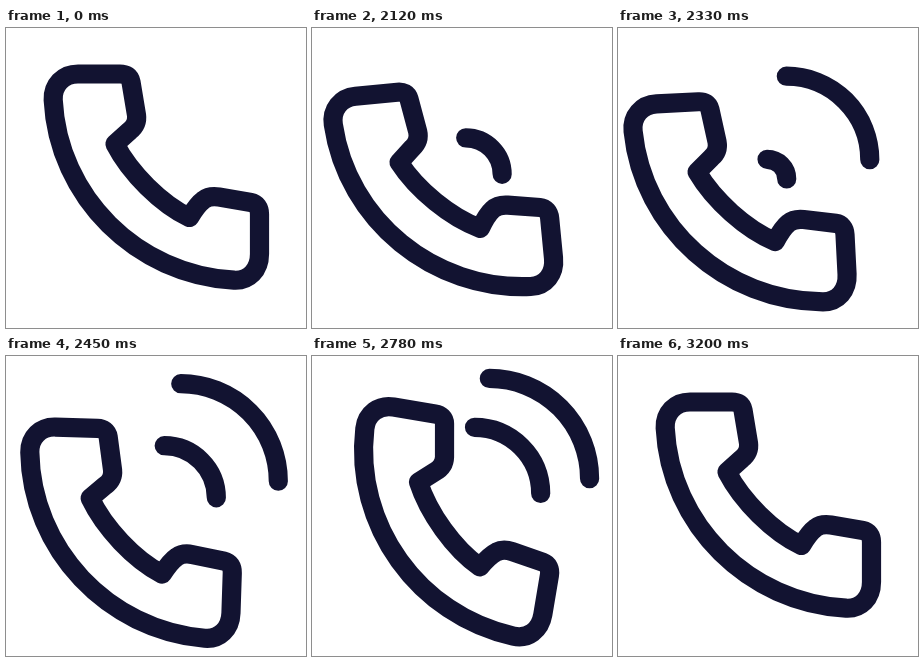
Recreate the animation shown at these times as an HTML page. Size 300 px wide and 300 px high, loop 3.26 s.

```html
<!DOCTYPE html>
<html lang="en">
<head>
<meta charset="utf-8">
<title>Ringing phone</title>
<style>
  html, body { margin: 0; width: 100%; height: 100%; overflow: hidden; background: #fff; }
  svg { display: block; width: 100%; height: 100%; }
</style>
</head>
<body>
<svg viewBox="0 0 300 300" fill="none" stroke="#121331" stroke-width="19.2" stroke-linecap="round" stroke-linejoin="round">
  <path id="phone" d="M72 46H114C120 46 124 48.500 125 54L130.500 87C131.300 93 129 98.500 124 102.500L109 116C124 145 155 176 183.500 189.500C188 182 192 176 197.500 172C202 168.500 207 168 213 169L245 174.500C250.500 175.500 253.500 180 253.500 186V226C253.500 242 243 253 228 252.200C131 247 52 169 47.200 72C46.500 57 57 46 72 46Z"/>
  <path class="wave"/>
  <path class="wave"/>
  <path class="wave"/>
</svg>
<script>
const LOOP = 3260, START = 2030, END = 3200, STEP = 30;
const WAVE_GAP = 270, WAVE_LIFE = 540;

const phone = document.getElementById('phone');
const waves = [...document.querySelectorAll('.wave')];

// Eased 0 to 1 between two times
function ease(t, from, to) {
  const u = Math.min(1, Math.max(0, (t - from) / (to - from)));
  return (1 - Math.cos(Math.PI * u)) / 2;
}

// Distance towards the lower left corner
const shift = t => 27 * ease(t, 2000, 2210) * (1 - ease(t, 2405, 3110));

// Steady shaking with a slow lean to the right, then settling
function tilt(t) {
  const shake = -9 * Math.sin(2 * Math.PI * (t - 2006) / 298);
  const lean = 0.0058 * (t - START);
  return (shake + lean) * (1 - ease(t, 2780, 3110));
}

// Quarter circle that grows while drifting to the upper right
function drawWave(el, age) {
  const shown = age >= 0 && age < WAVE_LIFE;
  el.style.display = shown ? '' : 'none';
  if (!shown) return;
  const r = 100.5 * Math.sin(Math.min(Math.PI / 2, 0.11 + 0.0029 * age));
  const x = 145 + 0.036 * age + 0.15 * r, y = 300 - x;
  el.setAttribute('d', `M${x} ${y - r}A${r} ${r} 0 0 1 ${x + r} ${y}`);
}

function render(time) {
  const t = START + Math.floor((time - START) / STEP) * STEP;
  const ringing = time >= START && time < END;
  const d = ringing ? shift(t) : 0;
  const angle = ringing ? tilt(t) : 0;
  phone.setAttribute('transform', `translate(${-d} ${d}) rotate(${angle} 126 173)`);
  waves.forEach((el, i) => drawWave(el, ringing ? t - START - i * WAVE_GAP : -1));
}

const origin = performance.now();
function tick() {
  render((performance.now() - origin) % LOOP);
  requestAnimationFrame(tick);
}
tick();
</script>
</body>
</html>
```
